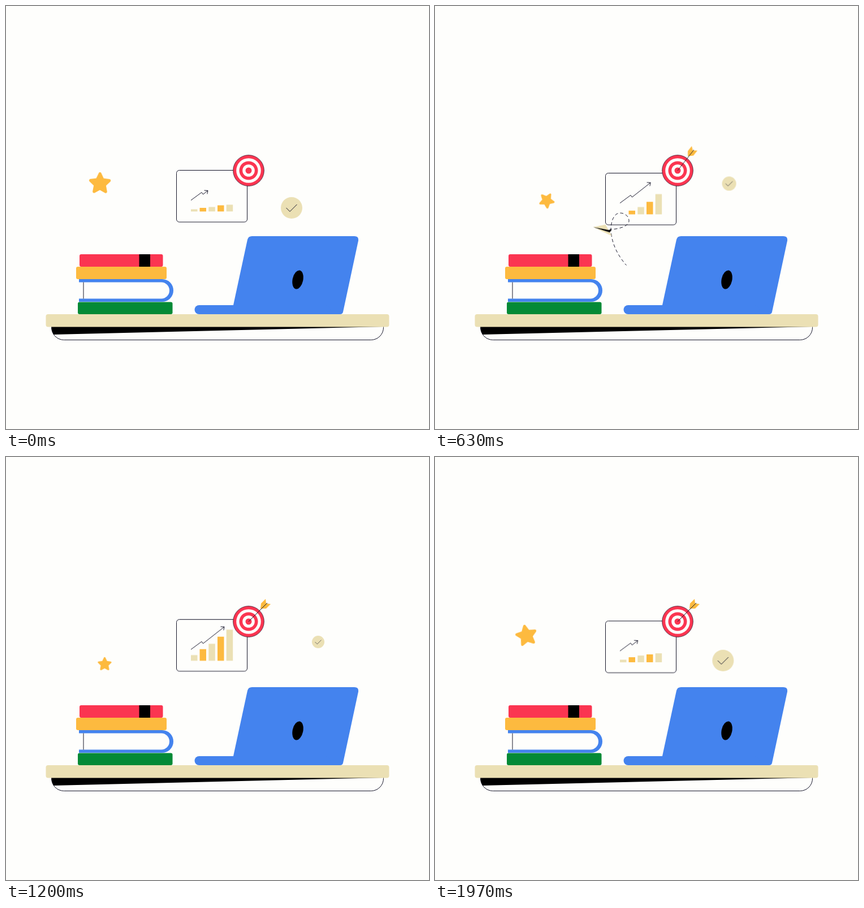
Recreate the animation shown at these times as an HTML page without scripts. Size 748x748 px, loop 2000 ms.

```html
<!DOCTYPE html>
<html lang="en">
<head>
<meta charset="utf-8">
<title>Desk</title>
<style>
  :root { --cream: #ebe0b4; --gold: #fdba3f; --red: #fb3551; --blue: #4483ee; --ink: #17172b; }
  html, body { margin: 0; width: 100%; height: 100%; overflow: hidden; background: #fefefc; }
  svg { display: block; width: 100vw; height: 100vh; }
  .cream { fill: var(--cream); }
  .gold { fill: var(--gold); }
  .red { fill: var(--red); }
  .blue { fill: var(--blue); }
  .white { fill: #fefefc; }
  .line { fill: none; stroke: var(--ink); stroke-width: 1; }

  .card { animation: bob 1s -.5s cubic-bezier(.364, 0, .636, 1) infinite alternate; }
  .bars rect { transform-origin: 0 363.5px; }
  .bars rect, .shaft, .head, .star, .badge, .dart, .fly, .plane, .window {
    animation: 2s linear infinite;
  }
  .bars rect { animation-name: grow; }
  .shaft { stroke-dasharray: 100 200; animation-name: draw; }
  .head { animation-name: lead; }
  .star { stroke: var(--gold); stroke-width: 5; stroke-linejoin: round; animation-name: star; }
  .badge { animation-name: badge; }
  .dart { animation-name: dart; }
  .fly { animation-name: fly; }
  .plane { animation-name: turn; }
  .window { fill: none; stroke: #fff; stroke-width: 3; stroke-dasharray: 32 300; animation-name: window; }
  .trail { stroke-dasharray: 1.1 .8; }

  @keyframes bob {
    from { transform: translateY(-5.5px); }
    to { transform: translateY(5.5px); }
  }
  @keyframes grow {
    0%, 100% { transform: scaleY(var(--a)); }
    11.5%, 20% { transform: scaleY(var(--b)); }
    31.5% { transform: scaleY(var(--c)); }
    39.5%, 73% { transform: scaleY(1); }
    76.5% { transform: scaleY(.97); }
    98.5% { transform: scaleY(var(--d)); }
  }
  @keyframes draw {
    0%, 16%, 100% { stroke-dashoffset: 77.3; }
    31.5% { stroke-dashoffset: 13; }
    38%, 72% { stroke-dashoffset: 0; }
    76.5% { stroke-dashoffset: 7.7; }
    98.5% { stroke-dashoffset: 73; }
  }
  @keyframes lead {
    0%, 16%, 100% { transform: translate(-29px, 22.8px); }
    31.5% { transform: translate(-4.9px, 3.8px); }
    38%, 72% { transform: none; }
    76.5% { transform: translate(-2.9px, 2.3px); }
    98.5% { transform: translate(-27.4px, 21.5px); }
  }
  @keyframes star {
    0% { transform: translate(166px, 314px) rotate(0deg) scale(1); }
    5% { transform: translate(174px, 314.5px) rotate(50deg) scale(.98); }
    11.5% { transform: translate(182.5px, 318px) rotate(108deg) scale(.93); }
    21.5% { transform: translate(192px, 330px) rotate(189deg) scale(.82); }
    31.5% { transform: translate(197.5px, 344px) rotate(246deg) scale(.71); }
    41.5% { transform: translate(198.5px, 359px) rotate(281deg) scale(.61); }
    50% { transform: translate(190px, 367px) rotate(317deg) scale(.6); }
    60% { transform: translate(174.5px, 366.5px) rotate(360deg) scale(.63); }
    68% { transform: translate(165px, 359px) rotate(386deg) scale(.7); }
    76.5% { transform: translate(160px, 348.5px) rotate(420deg) scale(.79); }
    89% { transform: translate(155px, 328px) rotate(533deg) scale(.91); }
    98.5% { transform: translate(161.5px, 316px) rotate(636deg) scale(.98); }
    100% { transform: translate(166px, 314px) rotate(648deg) scale(1); }
  }
  @keyframes badge {
    0%, 100% { transform: translate(505px, 357px) scale(1); }
    5% { transform: translate(501.5px, 350px) scale(.97); }
    11.5% { transform: translate(501.5px, 340px) scale(.92); }
    21.5% { transform: translate(508.5px, 325px) scale(.79); }
    31.5% { transform: translate(520px, 314px) scale(.66); }
    41.5% { transform: translate(535.5px, 308px) scale(.55); }
    50% { transform: translate(547px, 314px) scale(.55); }
    60% { transform: translate(552px, 327px) scale(.58); }
    68.5% { transform: translate(549.5px, 338px) scale(.65); }
    76.5% { transform: translate(541px, 348px) scale(.75); }
    87.5% { transform: translate(525px, 357.5px) scale(.9); }
    98.5% { transform: translate(509.5px, 360px) scale(1); }
  }
  @keyframes dart {
    0%, 4.5% { transform: translate(765px, 102px) rotate(30deg); }
    11.5% { transform: translate(662px, 128px) rotate(26deg); }
    17% { transform: translate(553px, 184px) rotate(15deg); }
    22% { transform: translate(429px, 291px) rotate(0deg); }
    25% { transform: translate(429px, 291px) rotate(-8deg); }
    28% { transform: translate(429px, 291px) rotate(6deg); }
    31.5% { transform: translate(429px, 291px) rotate(-7deg); }
    35% { transform: translate(429px, 291px) rotate(3deg); }
    39%, 100% { transform: translate(429px, 291px) rotate(0deg); }
  }
  @keyframes fly {
    0%, 5% { opacity: 0; }
    5.1%, 49% { opacity: 1; }
    54.5%, 100% { opacity: 0; }
  }
  @keyframes turn {
    0%, 11.5% { transform: rotate(-46deg) scale(.3); }
    24.5% { transform: rotate(5deg) scale(.27); }
    27% { transform: rotate(90deg) scale(.28); }
    28.9% { transform: rotate(180deg) scale(.3); }
    31.5% { transform: rotate(290deg) scale(.35); }
    41.5% { transform: rotate(360deg) scale(1); }
    53.5%, 100% { transform: rotate(370deg) scale(.7); }
  }
  @keyframes window {
    0% { stroke-dashoffset: 32; }
    11.5% { stroke-dashoffset: 30.5; }
    31.5% { stroke-dashoffset: -21.2; }
    41.5% { stroke-dashoffset: -37; }
    53.5%, 100% { stroke-dashoffset: -56; }
  }
</style>
</head>
<body>
<svg viewBox="0 0 748 748">
  <defs>
    <path id="route" pathLength="100" d="M430 520C390 505 360 480 338 458C322 440 312 418 311 396C311 378 318 366 327 366S343 372 343 380C343 390 322 396 304 395C275 394 252 378 240 357C232 340 228 300 228 200"/>
    <mask id="reveal" maskUnits="userSpaceOnUse" x="0" y="0" width="748" height="748">
      <use href="#route" class="window"/>
    </mask>
  </defs>

  <g class="card">
    <rect class="line" x="301.5" y="290.5" width="125" height="91.5" rx="5"/>
    <g class="bars">
      <rect class="cream" x="327" y="353.5" width="11.5" height="10" style="--a:.4;--b:.15;--c:0;--d:.45"/>
      <rect class="gold" x="342.5" y="343" width="11.5" height="20.5" style="--a:.32;--b:.2;--c:.32;--d:.44"/>
      <rect class="cream" x="358.3" y="333.5" width="11.5" height="30" style="--a:.27;--b:.2;--c:.43;--d:.4"/>
      <rect class="gold" x="374" y="321" width="11.5" height="42.5" style="--a:.26;--b:.21;--c:.52;--d:.33"/>
      <rect class="cream" x="389.7" y="308.5" width="11.5" height="55" style="--a:.22;--b:.2;--c:.65;--d:.29"/>
    </g>
    <path class="line" d="M327 343.5L346 329.5L348.5 333"/>
    <path class="line shaft" pathLength="100" d="M348.5 333L386 303.5"/>
    <path class="line head" d="M379.5 303.2L386 303.5L384.8 309.5"/>
  </g>

  <g transform="translate(429 291)">
    <circle class="red" r="27.4" stroke="#17172b" stroke-width=".7"/>
    <circle class="white" r="21.8"/>
    <circle class="red" r="16.5"/>
    <circle class="white" r="10.8"/>
    <circle class="red" r="5.5"/>
  </g>
  <g class="dart">
    <path class="gold" d="M21 -23L22 -32L30 -40L31 -32L39 -31L31 -23Z"/>
    <path class="line" d="M0 0L33 -33"/>
  </g>

  <path class="gold star" d="M0 -17.5L5 -7L16.6 -5.4L8.2 2.7L10.3 14.2L0 8.6L-10.3 14.2L-8.2 2.7L-16.6 -5.4L-5 -7Z"/>
  <g class="badge">
    <circle class="cream" r="19"/>
    <path class="line" d="M-9.5 0L-3 6.5L9.5 -6"/>
  </g>

  <g class="fly">
    <g mask="url(#reveal)"><use href="#route" class="line trail"/></g>
    <g>
      <g class="plane">
        <path class="cream" d="M-21 -90L-30 13L-17 -2ZM-21 -90L12 -36L-8 -12Z"/>
        <path d="M-21 -90L-17 -2L1 0L-8 -12Z"/>
      </g>
      <animateMotion dur="2s" repeatCount="indefinite" calcMode="linear"
        keyTimes="0;.115;.315;.415;.535;1" keyPoints="0;.015;.532;.693;.88;.88">
        <mpath href="#route"/>
      </animateMotion>
    </g>
  </g>

  <g class="blue">
    <path d="M435 407H616Q624 407 623 415L596 541Q595 545 591 545H398.5L427 413Q428.500 407 435 407Z"/>
    <rect x="333.500" y="529" width="240" height="16" rx="8"/>
  </g>
  <ellipse rx="9.300" ry="16.800" transform="translate(516 484) rotate(12)"/>

  <rect class="red" x="130" y="439" width="147.500" height="22" rx="3"/>
  <path d="M235.500 439H255V461H235.500Z"/>
  <rect class="gold" x="124" y="461" width="160" height="22" rx="3"/>
  <path class="blue" d="M129 483H276A20 20 0 0 1 276 523H129Z"/>
  <path class="white" d="M129 488.500H274.500A14.500 14.500 0 0 1 274.500 517.500H129Z"/>
  <path class="line" d="M137 488.500V517.500"/>
  <rect x="127" y="523.500" width="167.500" height="21.500" rx="3" fill="#048a36"/>

  <path class="line" d="M80.500 567V568.500A22 22 0 0 0 102.500 590.500H645.500A22 22 0 0 0 667.500 568.500V567"/>
  <path d="M80.500 567H667.500L84.500 581Q80.500 575 80.500 567Z"/>
  <rect class="cream" x="70.500" y="545" width="607" height="22.500" rx="4"/>
</svg>
</body>
</html>
```
